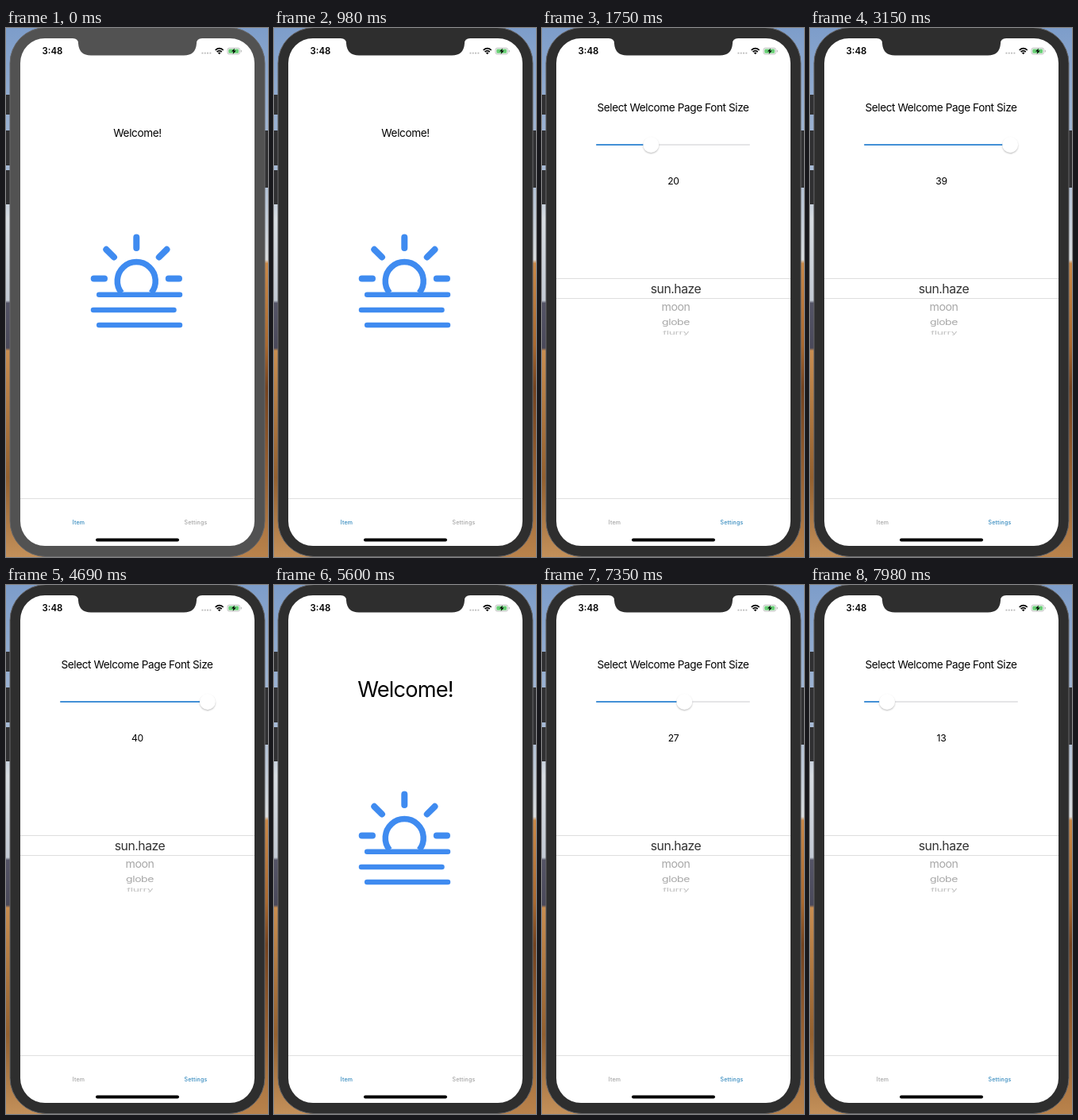
These frames come from a looping animation (330 by 666 pixels, 8000 ms). An HTML page without scripts:

```html
<!DOCTYPE html>
<html lang="en">
<head>
<meta charset="utf-8">
<title>Welcome settings</title>
<style>
@property --value { syntax: "<number>"; inherits: true; initial-value: 20; }
@property --shown { syntax: "<integer>"; inherits: true; initial-value: 20; }

html, body { margin: 0; width: 100%; height: 100%; overflow: hidden; }
body { position: relative; font-family: Inter, "Open Sans", sans-serif; background: #fff; }
svg { position: absolute; left: 0; top: 0; width: 330px; height: 666px; }
text { text-anchor: middle; letter-spacing: -.03em; }

.bezel { fill: #2e2e2e; animation: focus 8s linear infinite; }
.home { animation: home 8s step-end infinite; }
.settings { animation: settings 8s step-end infinite; }
.welcome { font-size: 13.6px; animation: resize 8s step-end infinite; }
.tab { font-size: 7px; font-weight: 500; letter-spacing: .2px; fill: #a2a2a2; }
.tab.on { fill: #3188bd; }
.sun { fill: none; stroke: #3f8bf0; stroke-width: 6.5; stroke-linecap: round; }
.sun .rays { stroke-width: 8; }

.slider { animation: settings 8s step-end infinite, drag 8s infinite; }
.slider div { position: absolute; }
.slider .track { left: 68px; top: 146.3px; width: 194px; height: 2.2px; border-radius: 1px; background: #e5e5e7; }
.slider .fill { left: 68px; top: 146.3px; width: calc(11px + (var(--value) - 10) * 5.83px); height: 2.2px; border-radius: 1px; background: #4390d6; }
.slider .thumb {
  left: 69px; top: 137px; width: 20px; height: 20px; border-radius: 50%;
  background: #fff; box-shadow: 0 1.3px 2px rgba(0, 0, 0, .24);
  transform: translateX(calc((var(--value) - 10) * 5.83px));
}
.slider .number {
  left: 125.5px; top: 185px; width: 80px; text-align: center;
  font-size: 12.2px; line-height: 16px; letter-spacing: -.03em;
  counter-reset: size var(--shown);
}
.number::after { content: counter(size); }

@keyframes focus { 0%, .875% { fill: #525252; } 5.25%, 100% { fill: #2e2e2e; } }
@keyframes home {
  0%, 60.375% { visibility: visible; }
  14.875%, 80.5%, 100% { visibility: hidden; }
}
@keyframes settings {
  0%, 60.375% { visibility: hidden; }
  14.875%, 80.5%, 100% { visibility: visible; }
}
@keyframes resize { 0% { font-size: 13.6px; } 40%, 100% { font-size: 27.2px; } }
@keyframes drag {
  0% { --value: 20; --shown: 20; }
  33.4% { --value: 20; --shown: 20; animation-timing-function: ease-in-out; }
  39.3% { --value: 39.7; --shown: 39; }
  41.6% { --value: 40; --shown: 40; }
  87.8% { --value: 40; --shown: 40; animation-timing-function: ease-in-out; }
  96.2% { --value: 13.2; --shown: 13; }
  99.7%, 100% { --value: 13.1; --shown: 13; }
}
</style>
</head>
<body>
<svg viewBox="0 0 330 666">
  <defs>
    <linearGradient id="west" x2="0" y2="1">
      <stop offset="0" stop-color="#7d9dca"/>
      <stop offset=".28" stop-color="#a9bcd6"/>
      <stop offset=".36" stop-color="#d8dde2"/>
      <stop offset=".515" stop-color="#c3cad4"/>
      <stop offset=".52" stop-color="#545466"/>
      <stop offset=".605" stop-color="#4a495a"/>
      <stop offset=".61" stop-color="#c88d50"/>
      <stop offset=".85" stop-color="#93602f"/>
      <stop offset="1" stop-color="#c3905a"/>
    </linearGradient>
    <linearGradient id="east" x2="0" y2="1">
      <stop offset="0" stop-color="#7d9dca"/>
      <stop offset=".3" stop-color="#b3c2d6"/>
      <stop offset=".438" stop-color="#d9dcde"/>
      <stop offset=".445" stop-color="#c98848"/>
      <stop offset=".6" stop-color="#a9682f"/>
      <stop offset=".68" stop-color="#74431f"/>
      <stop offset=".85" stop-color="#9a6232"/>
      <stop offset="1" stop-color="#b9834c"/>
    </linearGradient>
  </defs>

  <rect width="165" height="666" fill="url(#west)"/>
  <rect x="165" width="165" height="666" fill="url(#east)"/>
  <path d="M0 84h6v25H0zM0 129h6v44H0zM0 179h6v43H0zM325 129h5v72h-5z" fill="#303032"/>

  <rect class="bezel" x="5" y="-.5" width="321" height="666" rx="45" stroke="#68686a"/>
  <rect x="18" y="13" width="295" height="639" rx="31" fill="#fff"/>
  <path class="bezel" d="M84 12.5v.5q7 0 7 6.500q1 15 16 15h117q15 0 16-15q0-6.500 7-6.500v-.5z"/>

  <text x="58.500" y="33" font-size="11.400" font-weight="600" style="letter-spacing:0">3:48</text>
  <path d="M246.500 31.700h12" stroke="#b9b9b9" stroke-width="1.800" stroke-dasharray="1.900 1.400"/>
  <g fill="none" stroke="#000" stroke-width="1.700">
    <path d="M263.700 27.800q5-4.300 10 0M265.600 30q3.100-2.600 6.200 0"/>
    <path d="M266.900 31.300q1.800-1.400 3.600 0l-1.800 2z" fill="#000" stroke="none"/>
  </g>
  <rect x="279" y="25.200" width="15.500" height="7.800" rx="2.200" fill="#fff" stroke="#b0b0b0" stroke-width=".8"/>
  <rect x="280.300" y="26.500" width="12.900" height="5.200" rx="1.200" fill="#69cf76"/>
  <path d="M296.300 27.800v2.600" stroke="#b0b0b0"/>
  <path d="M288 25.400l-4 4.200h2.500l-.8 3.300 4-4.300h-2.500z"/>

  <path d="M18 592.500h295" stroke="#e0e0e0"/>
  <rect x="113" y="642.500" width="105" height="4" rx="2"/>

  <g class="home">
    <text class="welcome" x="165.500" y="132" dy=".34em">Welcome!</text>
    <g class="sun">
      <path d="M145.500 333.500a24 24 0 1 1 37.500 0" stroke-width="7.500" stroke-linecap="butt"/>
      <path class="rays" d="M164.300 263.500v13.500M126.300 278.800l9.700 9.700M202.500 278.800l-9.700 9.700M110.700 315.500h13.300M204.800 315.500h13.200"/>
      <path d="M117.200 335.800h101.800M110 355h101.500M117.200 374h101.800"/>
    </g>
    <text class="tab on" x="91.500" y="625">Item</text>
    <text class="tab" x="239" y="625">Settings</text>
  </g>

  <g class="settings">
    <text x="165" y="105" font-size="13.600">Select Welcome Page Font Size</text>
    <path d="M18 315.500h295M18 340.500h295" stroke="#dedede"/>
    <text x="168.500" y="334" font-size="15.800" fill="#333">sun.haze</text>
    <text x="168.500" y="355.500" font-size="14.200" fill="#a8a8a8">moon</text>
    <g font-size="14">
      <text transform="translate(168.500 373.500) scale(1 .72)" fill="#a6a6a6">globe</text>
      <text transform="translate(168.500 386) scale(1 .4)" fill="#c0c0c0">flurry</text>
    </g>
    <text class="tab" x="91.500" y="625">Item</text>
    <text class="tab on" x="239" y="625">Settings</text>
  </g>
</svg>

<div class="slider">
  <div class="track"></div>
  <div class="fill"></div>
  <div class="thumb"></div>
  <div class="number"></div>
</div>
</body>
</html>
```
